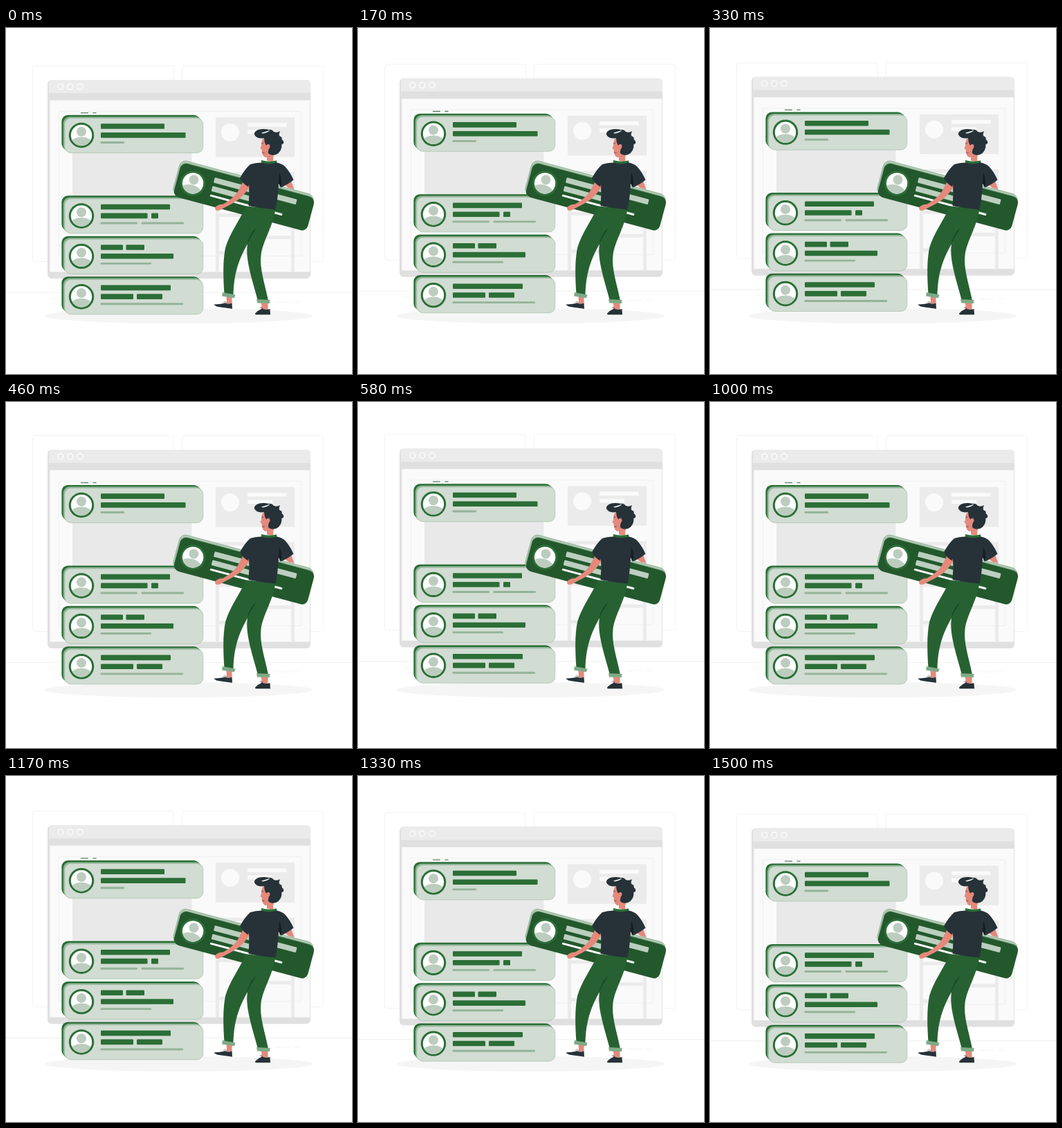
An HTML page that plays this animation: 500x500 px, repeating every 1540 ms.

```html
<!DOCTYPE html>
<html lang="en">
<head>
<meta charset="utf-8">
<style>
html, body { margin: 0; width: 100%; height: 100%; overflow: hidden; background: #fff; }
svg { display: block; width: 100vw; height: 100vh; }
</style>
</head>
<body>
<svg viewBox="0 0 500 500">
  <defs>
    <clipPath id="disc"><circle r="15.2"/></clipPath>
    <g id="avatar">
      <circle r="18.2" fill="#2b6e36"/>
      <circle r="15.2" fill="#fff"/>
      <g clip-path="url(#disc)" fill="#bccdbf">
        <circle cy="-5.2" r="7"/>
        <ellipse cy="14" rx="17" ry="11.5"/>
      </g>
    </g>
  </defs>

  <ellipse cx="249.5" cy="416" rx="194" ry="11" fill="#f5f5f5"/>

  <g id="float">
    <g fill="#fff" stroke="#f2f2f2">
      <rect x="38.5" y="55" width="204" height="283" rx="4"/>
      <rect x="254.5" y="55" width="204" height="283" rx="4"/>
      <path d="M0 382.8H500" stroke="#efefef"/>
      <path d="M65 391H80M388 396.5H410M415 396.5H424" stroke="#f4f4f4"/>
    </g>
    <rect x="60" y="75.5" width="380" height="287" rx="6" fill="#e0e0e0"/>
    <path d="M62 94.5V81.500Q62 75.500 68 75.500H434Q440 75.500 440 81.500V94.500Z" fill="#ebebeb"/>
    <rect x="63.500" y="105" width="375.500" height="248" fill="#fafafa"/>
    <g fill="none" stroke="#fff" stroke-width="1.200">
      <circle cx="78.700" cy="85.300" r="4.200"/>
      <circle cx="92.800" cy="85.300" r="4.200"/>
      <circle cx="107" cy="85.300" r="4.200"/>
    </g>
    <rect x="76.500" y="121" width="349.500" height="209" fill="none" stroke="#f0f0f0"/>
    <rect x="96" y="150" width="172.500" height="130" fill="#e9e9e9"/>
    <rect x="303" y="129.500" width="114" height="57.500" fill="#ebebeb"/>
    <g fill="#fafafa">
      <circle cx="324" cy="151.500" r="13"/>
      <path d="M349 137.700h56.500v5.600H349zM349 148h36v5.600H349z"/>
    </g>
    <path d="M305.500 353V211.500H414.500V353M305 271H362M362 303H414M305 325.500H362" fill="none" stroke="#ebebeb" stroke-width="5"/>
    <path d="M108 123.200h11M125.500 123.200h5" stroke="#5b8263" stroke-width="1.300"/>
    <g id="cards"></g>
  </g>

  <g transform="translate(344 244.200) rotate(15)">
    <rect x="-102" y="-28.600" width="200" height="50.400" rx="9" fill="#b7cbb9" stroke="#7fa585" stroke-width=".7"/>
    <rect x="-101" y="-26.300" width="200" height="50.400" rx="9" fill="#8fb596"/>
    <rect x="-100" y="-25.200" width="200" height="50.400" rx="9" fill="#23582c"/>
    <use href="#avatar" x="-76.500"/>
    <g fill="#bccfbf">
      <rect x="-48" y="-16.300" width="123" height="7.600" rx="1"/>
      <rect x="-48" y="-3.600" width="68" height="7.600" rx="1"/>
    </g>
    <rect x="-48" y="9" width="108" height="2.900" rx="1.200" fill="#fff"/>
  </g>

  <g id="man">
    <g fill="#e4897b">
      <path d="M402 226L412 221L416.500 233L408 231Z"/>
      <path d="M318.500 387L326.500 388V399H319ZM368 396H378.500V407H371Z"/>
      <path d="M377 180L387 178L386 192Q381 194 377 191Z"/>
      <path d="M371 160Q368.500 166 369 170L367.500 174L369.500 175.500Q369.500 185 375 187Q382 187 385 180L388 164L378 155Z"/>
      <path d="M344 219L353 227Q347 239 336 248Q324 256 313 261Q308 265 303.500 263.500Q301 261.500 303 258.500Q307 254.500 314 254.500Q327 247 334 238Q339 229 344 219Z"/>
    </g>
    <g fill="#263238">
      <path d="M300.500 399.500Q308 399.500 317 397.500Q321 400 326.500 397.500L327 405.700L314 404Q302 403 300.500 399.500Z"/>
      <path d="M360 412.500Q364 408 370 405.500Q375 408 381.500 406L382 414.300H361Q360 414 360 412.500Z"/>
    </g>
    <path d="M314 396l4 3M316 394.500l3 3.500M367 403.500l4 3M369 402.500l2 4" stroke="#263238" stroke-width=".7"/>
    <path d="M347 257.500C337 279 323 297 317 318C313 338 314 361 315.500 385L328.500 387C329 362 333 340 349 312C345 335 358 370 364 394.500L379 394C374 369 366 347 368.500 328C371 308 386 287 389.500 261Z" fill="#276131"/>
    <path d="M363 288Q351 297 348 314Q352 303 363 288Z" fill="#1c4825"/>
    <path d="M313 382L331.500 385.500L330 390.200L312 387.500ZM362 392L381.500 393L381 398L363 397.500Z" fill="#7eaa86"/>
    <path d="M369 191Q380 194 391 191.500L392 197H369Z" fill="#2b6e36"/>
    <path d="M369 194.500Q380 198 391 194.500Q400 196 404 201Q411 209 415.500 219.500Q406 227 397 230.500L394 224Q393 246 389.500 262.500Q370 261 350.500 257Q352 241 351 226L350 229.500Q342 225 338 217Q345 204 353 197Q360 194.500 369 194.500Z" fill="#263238"/>
    <path d="M395 209Q400 221 397 230L394 225Z" fill="#151e22"/>
    <path d="M359 154C358 148 368 144 380 147Q384 146 387 150Q392 152 396 149Q394 153 395 156Q400 158 398.500 161Q402 163 401 167L398.500 168Q399 179 390 183Q384 185 380 182Q378 180 379.500 176Q381 173 380.500 169Q377 167 376 170Q373 165 373 159Q362 161 359 154Z" fill="#263238"/>
    <path d="M369 151.500Q375 150 382 147.500Q378 151.500 371 152.500Z" fill="#fff"/>
    <path d="M377 169Q381 166 381.500 171Q381 175 377 175Z" fill="#e4897b"/>
    <path d="M369.500 167l2.500-1M370.500 180l3 .5" stroke="#263238" stroke-width=".7"/>
  </g>
</svg>
<script>
const LOOP = 1540, STEPS = 37, RISE = 10;

// Per card: two rows of thick bars, one row of thin lines, as [left, right].
const cards = [
  [[[137, 229]], [[137, 259.5]], [[136.5, 171]]],
  [[[137, 237]], [[137, 204.5], [210, 220]], [[136.5, 190], [195.5, 257]]],
  [[[137, 169], [173.5, 200]], [[137, 242]], [[136.5, 210]]],
  [[[137, 238]], [[137, 184], [189, 226]], [[136.5, 256]]]
];
const tops = [126.4, 242.9, 301.3, 359.7];
const rows = [
  { y: 12.4, h: 7.6, fill: '#2b6e36' },
  { y: 25.2, h: 7.6, fill: '#2b6e36' },
  { y: 38.2, h: 2.9, fill: '#95b39a' }
];

const rect = (x, y, w, h, r, fill, more = '') =>
  `<rect x="${x}" y="${y}" width="${w}" height="${h}" rx="${r}" fill="${fill}" ${more}/>`;
const layer = (d, fill, more) => rect(80.4 + d, d, 200, 50.2, 9, fill, more);

function card(lines, i) {
  const bars = lines.map((row, n) => {
    const { y, h, fill } = rows[n];
    return row.map(([a, b]) => rect(a, y, b - a, h, 1.2, fill)).join('');
  }).join('');
  return `<g transform="translate(0 ${tops[i]})">` +
    layer(0, '#2b6e36') + layer(1.2, '#2b6e36') +
    layer(2.4, '#8fb596') + layer(3.3, '#8fb596') +
    layer(4.4, '#d1dcd2', 'stroke="#9db9a1" stroke-width=".6"') +
    `<use href="#avatar" x="109" y="29.1"/>${bars}</g>`;
}
document.getElementById('cards').innerHTML = cards.map(card).join('');

const float = document.getElementById('float');

// Linear rise and fall, stepped at 24 pictures per second.
function draw(now) {
  const step = Math.floor((now % LOOP) / LOOP * STEPS + 0.2);
  const p = ((step + 1) % STEPS) / STEPS;
  const y = -RISE * (1 - Math.abs(1 - 2 * p));
  float.setAttribute('transform', `translate(0 ${y.toFixed(3)})`);
}

const start = performance.now();
function tick() {
  draw(performance.now() - start);
  requestAnimationFrame(tick);
}
tick();
</script>
</body>
</html>
```
